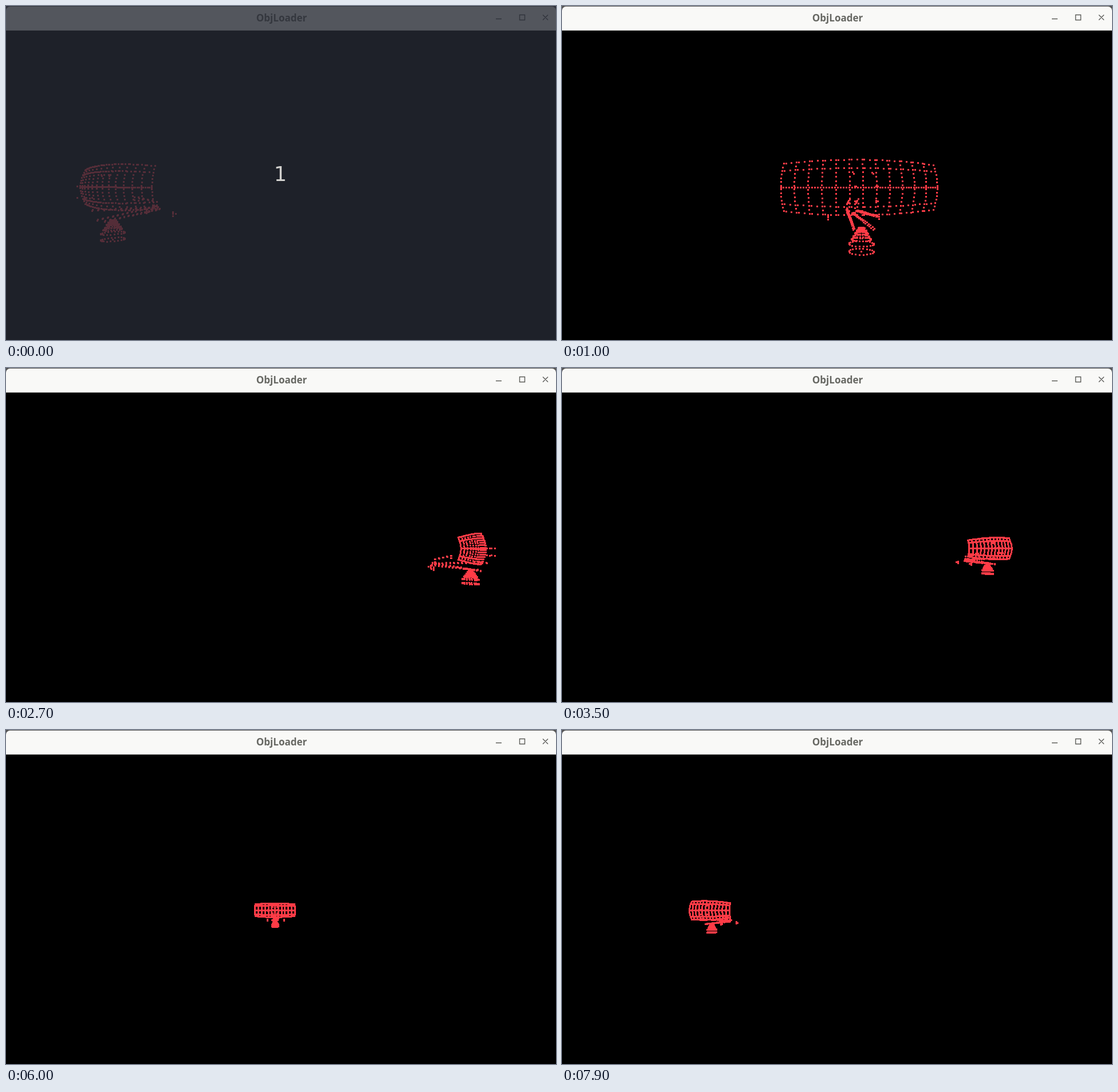
An HTML page with a canvas for the animation above (8 s loop, 960 by 584 pixels).

```html
<!DOCTYPE html>
<html>
<head>
<meta charset="utf-8">
<style>
html, body { margin: 0; width: 960px; height: 584px; overflow: hidden; background: #000; }
canvas { display: block; }
</style>
</head>
<body>
<canvas id="stage" width="960" height="584"></canvas>
<script>
const ctx = document.getElementById('stage').getContext('2d');
const FOCAL = 458, DIST = 9.91, RADIUS = 5.9, CX = 480, CY = 314;
const points = [];

// u: sideways, y: up, v: outward from the pedestal axis
const add = (u, y, v) => points.push([u, y, v]);

function line(a, b, n) {
  for (let i = 0; i < n; i++) {
    const k = i / (n - 1);
    add(...a.map((p, j) => p + (b[j] - p) * k));
  }
}

// A beam is two parallel lines of dots
function beam(a, b, n) {
  line(a, b, n);
  line([a[0] + 0.02, a[1] + 0.015, a[2]], [b[0] + 0.02, b[1] + 0.015, b[2]], n);
}

// Curved reflector; e runs from -1 (bottom) to 1 (top)
const HALF = 1.21;
function dish(u, e) {
  const y = e * (0.418 - 0.06 * (u / HALF) ** 2);
  const v = 0.18 - 0.043 * u - 0.109 * u * u - 0.6 * y * y;
  add(u * (1 - 0.028 * e * e), y - 0.025, v);
}

function buildDish() {
  const step = HALF / 6;
  for (let c = 0; c <= 12; c++) {
    const u = -HALF + c * step;
    for (let i = 0; i < 14; i++) dish(u, -1 + i * 2 / 13);
    if (c === 12) break;
    for (const e of [-1, -0.69, 0.69, 1])
      for (const k of [0.17, 0.6]) dish(u + k * step, e);
  }
  for (let i = 0; i <= 58; i++) dish(-HALF + i * HALF / 29, 0);
}

function buildBase() {
  const rings = [[-0.65, 0.05], [-0.69, 0.075], [-0.73, 0.1], [-0.78, 0.125],
                 [-0.82, 0.15], [-0.89, 0.19], [-1.01, 0.19]];
  for (const [y, r] of rings)
    for (let i = 0; i < 20; i++) {
      const a = i * Math.PI / 10;
      add(r * Math.cos(a), y, r * Math.sin(a));
    }
  add(0, -1.01, 0);
}

function buildArms() {
  beam([-0.14, -0.46, -0.95], [-0.15, -0.64, 0.2], 14);
  beam([-0.03, -0.52, -0.95], [0.145, -0.64, 0.2], 14);
  beam([0.04, -0.47, -0.87], [0.14, -0.43, 0.4], 14);
  // Horn
  for (const u of [-0.13, 0.02]) {
    line([u, -0.34, -0.87], [u, -0.23, -0.47], 5);
    line([u, -0.34, -0.87], [u, -0.5, -0.87], 3);
    line([u, -0.23, -0.47], [u, -0.3, -0.47], 2);
  }
  // Rear brackets
  for (const u of [-0.15, 0.14]) {
    line([u, 0.2, 0.13], [u + 0.02, 0.18, 0.13], 2);
    for (const y of [-0.01, -0.21]) line([u, y, 0.4], [u, y, 0.51], 2);
  }
  // Feet of the feed
  for (const u of [-0.48, 0.48]) {
    line([u, -0.55, -0.94], [u, -0.63, -0.94], 3);
    add(u, -0.59, -1);
  }
}

function drawModel(seconds) {
  const a = (36 * seconds - 32.4) * Math.PI / 180;
  const c = Math.cos(a), s = Math.sin(a);
  ctx.fillStyle = '#ff3b46';
  for (const [u, y, v] of points) {
    const r = RADIUS + v;
    const scale = FOCAL / (DIST + u * s - r * c);
    const x = CX + (u * c + r * s) * scale;
    ctx.fillRect(Math.round(x) - 1, Math.round(CY - y * scale) - 1, 3, 3);
  }
}

function text(str, x, y, font, color) {
  ctx.font = font;
  ctx.fillStyle = color;
  ctx.textAlign = 'center';
  ctx.fillText(str, x, y);
}

function drawTitleBar() {
  ctx.fillStyle = '#555';
  ctx.fillRect(0, 0, 960, 8);
  ctx.fillStyle = '#f9f9f7';
  ctx.beginPath();
  ctx.roundRect(0, 1, 960, 41, [7, 7, 0, 0]);
  ctx.fill();
  ctx.fillStyle = '#d8d8d4';
  ctx.fillRect(0, 42, 960, 1);
  text('ObjLoader', 481, 27, 'bold 17px "Noto Sans", "Open Sans", sans-serif', '#666762');
  ctx.strokeStyle = '#5c5d59';
  ctx.lineWidth = 1.4;
  ctx.beginPath();
  ctx.moveTo(855, 22.5); ctx.lineTo(865, 22.5);
  ctx.rect(896.5, 15.5, 9, 9);
  ctx.moveTo(937, 15.5); ctx.lineTo(946, 24.5);
  ctx.moveTo(946, 15.5); ctx.lineTo(937, 24.5);
  ctx.stroke();
}

function drawCountdown() {
  ctx.fillStyle = 'rgba(39, 43, 52, 0.79)';
  ctx.fillRect(0, 0, 960, 584);
  text('1', 479, 306, '35px "DejaVu Sans", sans-serif', '#d3d2cf');
}

function draw(now) {
  const t = Math.floor((now % 8000) / 100) * 100;
  ctx.fillStyle = '#000';
  ctx.fillRect(0, 0, 960, 584);
  drawModel(t / 1000);
  drawTitleBar();
  if (t < 100) drawCountdown();
  requestAnimationFrame(loop);
}

const start = performance.now();
function loop() { draw(Math.max(0, performance.now() - start)); }

buildDish();
buildBase();
buildArms();
loop();
</script>
</body>
</html>
```
